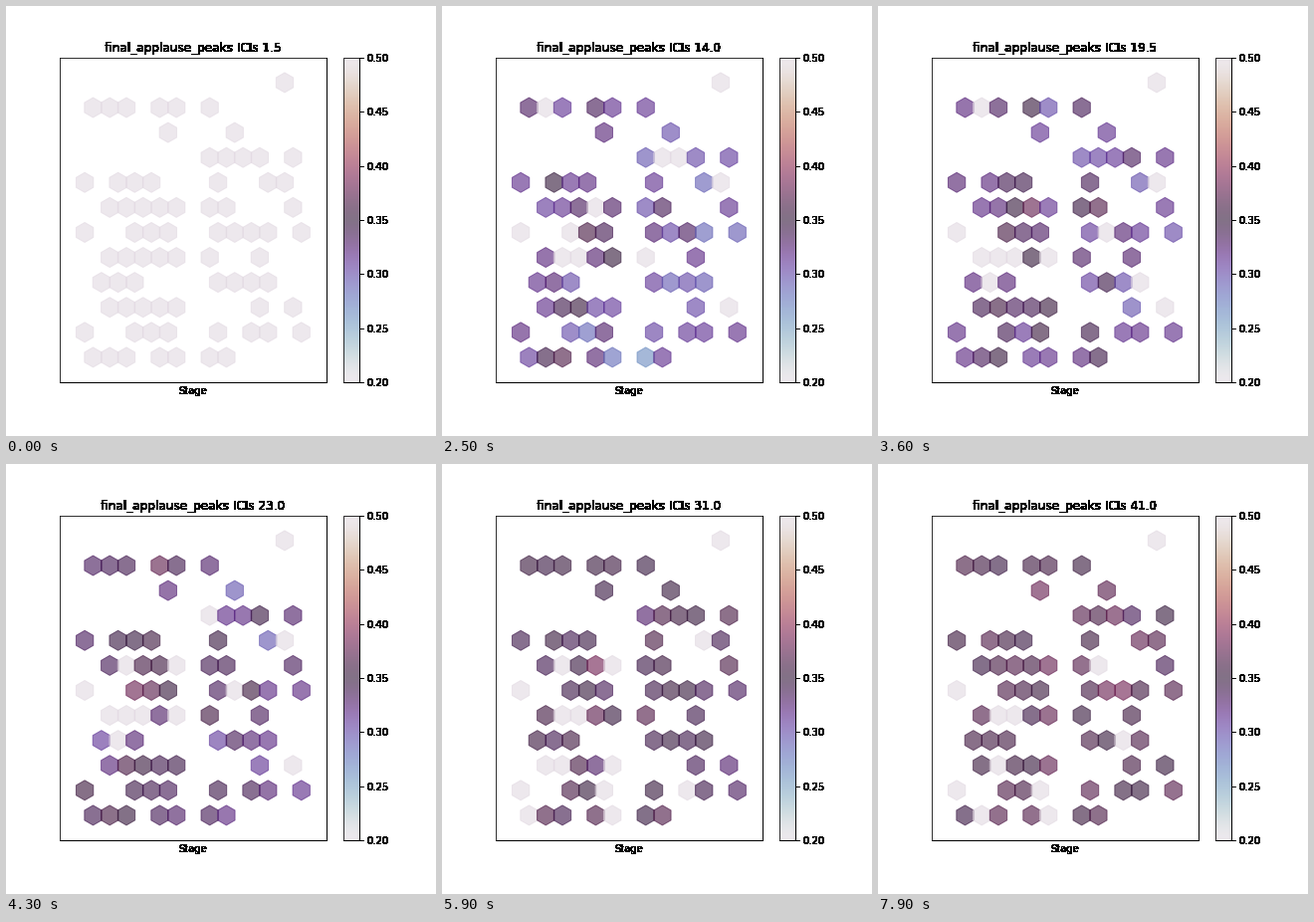
A matplotlib script that plays this animation: 432 px wide and 432 px high, repeating every 8000 ms.

```python
import numpy as np
import matplotlib.pyplot as plt
from matplotlib.animation import FuncAnimation

DPI, SIZE = 72, 432
FRAMES, STEP = 80, 100
LOW, HIGH = 0.2, 0.5
ONSET, SETTLED = 10, 0.362

# Runs of neighbours (first seat, how many), from the front row to the back.
ROWS = [
    [(4, 3), (12, 2), (18, 2)],
    [(3, 1), (9, 3), (19, 1), (23, 2), (29, 1)],
    [(6, 5), (24, 1), (28, 1)],
    [(5, 3), (19, 4)],
    [(6, 5), (18, 1), (24, 1)],
    [(3, 1), (9, 3), (19, 4), (29, 1)],
    [(6, 5), (18, 2), (28, 1)],
    [(3, 1), (7, 3), (19, 1), (25, 2)],
    [(18, 4), (28, 1)],
    [(13, 1), (21, 1)],
    [(4, 3), (12, 2), (18, 1)],
    [(27, 1)],
]
SILENT = {(27, 12), (3, 6), (8, 5), (10, 5)}

seats = [(first + 2 * k, y)
         for y, row in enumerate(ROWS, 1)
         for first, size in row
         for k in range(size)]
x, y = np.array(seats).T
count = len(seats)
silent = np.array([s in SILENT for s in seats])

rng = np.random.default_rng(11)
# The slow beat starts left of the middle and spreads to everyone.
start = 0.285 + 0.075 * np.exp(-((x - 11) / 4) ** 2 - ((y - 7) / 4) ** 2)
habit = rng.normal(0, 0.018, count)
jitter = rng.normal(0, 1, (FRAMES, count))
joins = ONSET + rng.integers(0, 5, count)
pause_mid = rng.uniform(ONSET, FRAMES, count)
pause_half = np.where(rng.random(count) < 0.4, rng.uniform(4, 18, count), 0)


def intervals(i):
    """Clap intervals in seconds: they drift together while spread shrinks."""
    t = max(0, (i - ONSET) / (FRAMES - 1 - ONSET))
    apart = (1 - t) ** 1.3
    value = SETTLED + (start + habit - SETTLED) * apart
    value = value + jitter[i] * (0.009 + 0.009 * apart)
    idle = silent | (i < joins) | (abs(i - pause_mid) < pause_half)
    return np.where(idle, LOW, np.clip(value, 0.22, 0.48))


def solid(image, dpi):
    """Turn every touched pixel fully black."""
    image = image.copy()
    image[..., :3] = 0
    image[..., 3] = image[..., 3] > 0
    return image, 0, 0


plt.rcParams["font.family"] = "DejaVu Sans"
fig = plt.figure(figsize=(SIZE / DPI, SIZE / DPI), dpi=DPI, facecolor="white")
ax = fig.add_axes([0.125, 0.125, 0.62, 0.755])
cax = fig.add_axes([0.78375, 0.125, 0.03775, 0.755])

ax.set(xlim=(0, 32), ylim=(0, 13), xticks=[], yticks=[])
label = ax.set_xlabel("Stage")
title = ax.set_title("", fontsize=12)
crowd = ax.scatter(x, y, c=np.full(count, LOW), s=400, marker="h",
                   linewidths=1, cmap="twilight", vmin=LOW, vmax=HIGH,
                   alpha=0.6)

bar = fig.colorbar(crowd, cax=cax, ticks=np.linspace(LOW, HIGH, 7),
                   format="%.2f")
for side in ("right", "bottom"):
    cax.spines[side].set_visible(True)

crisp = [title, label]
crisp += [a.spines[side] for a in (ax, cax) for side in ("right", "bottom")]
for tick in cax.yaxis.get_major_ticks():
    crisp += [tick.label2, tick.tick2line]
for artist in crisp:
    artist.set_agg_filter(solid)


def update(i):
    crowd.set_array(intervals(i))
    title.set_text(f"final_applause_peaks ICIs {1.5 + i / 2:.1f}")
    return crowd, title


anim = FuncAnimation(fig, update, frames=FRAMES, interval=STEP,
                     repeat=True, repeat_delay=0, blit=False)
plt.show()
```
